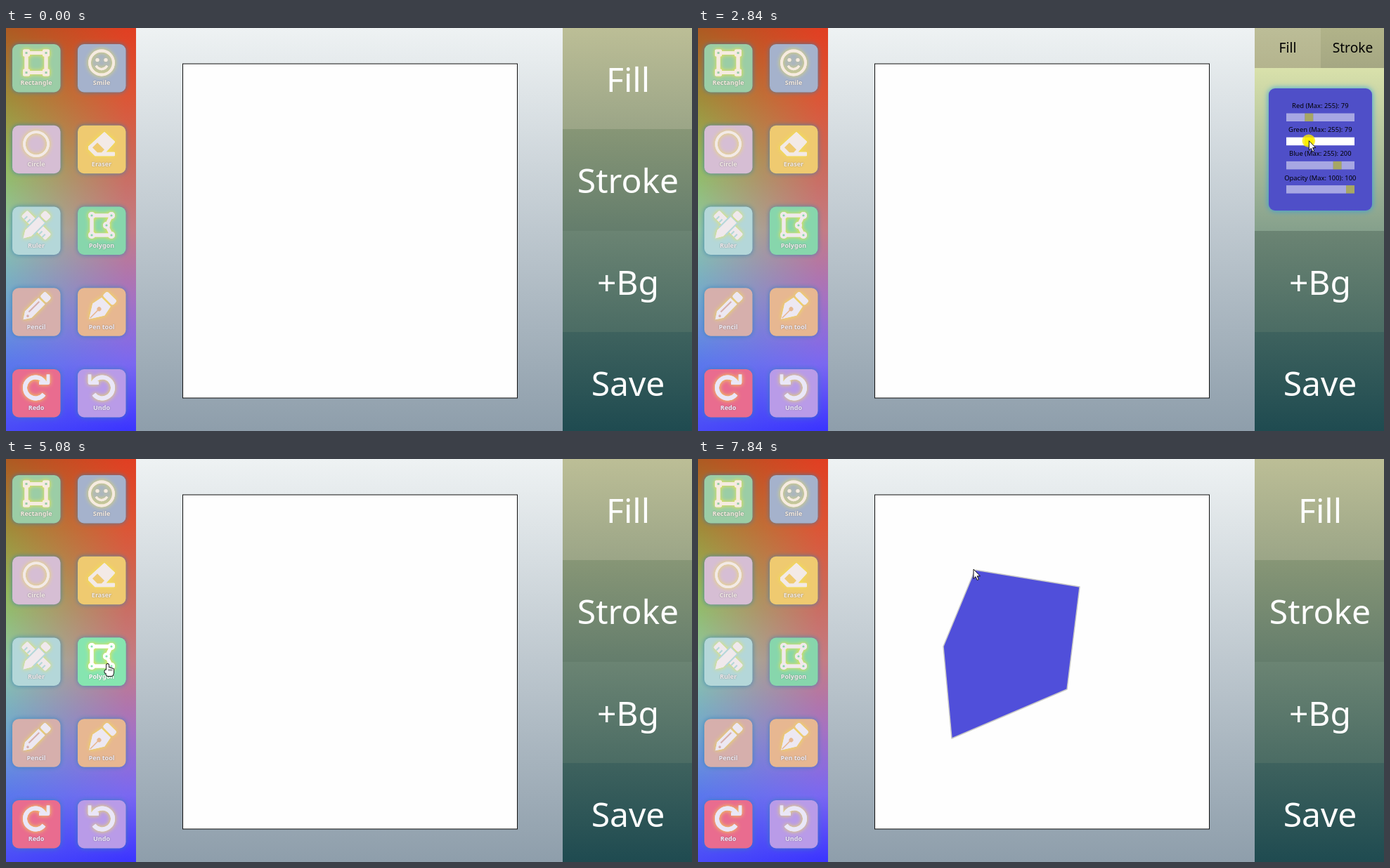
An HTML page with a canvas that plays this animation: 976x574 px, repeating every 7990 ms.

```html
<!DOCTYPE html>
<html lang="en">
<head>
<meta charset="utf-8">
<title>Drawing app</title>
<style>
html, body { margin: 0; width: 100%; height: 100%; overflow: hidden; }
canvas { display: block; }
</style>
</head>
<body>
<canvas id="stage" width="976" height="574"></canvas>
<script>
const LOOP = 7990;
const FONT = '"Noto Sans", "Open Sans", sans-serif';
const OPEN = 760, SHUT = 3450, FILLED = 7755;
const view = document.getElementById('stage').getContext('2d');
let g = view;

// name, drag start, drag length, final value (all begin at 200)
const CHANNELS = [['Red', 1610, 390, 79], ['Green', 2450, 300, 79], ['Blue', 3080, 110, 220]];
const CORNERS = [[394, 158], [543, 182], [525, 328], [361, 398], [349, 267]];

const clickTime = i => 5440 + 345 * i;
const rowY = i => 121.5 + 34.2 * i;
const thumbX = v => 837 + 85 * v;
const within = (t, a, b) => t >= a && t < b;
function ease(t, a, b, from, to) {
  const k = Math.min(1, Math.max(0, (t - a) / (b - a)));
  return from + (to - from) * k * k * (3 - 2 * k);
}

const path = [], presses = [];
function go(t, x, y, stay = 0) {
  path.push([t, x, y]);
  if (stay) path.push([t + stay, x, y]);
}
function buildPath() {
  go(70, 890, 512);
  go(610, 884, 40, 150);
  go(1220, 884, 55);
  CHANNELS.forEach(([, start, length, end], i) => {
    const y = rowY(i) + 5;
    go(start - 50, thumbX(200 / 255) + 6, y, 50);
    go(start + length, thumbX(end / 255) + 6, y, 130);
    presses.push([start, start + length + 130]);
  });
  go(3900, 150, 270);
  go(4220, 141, 225);
  go(4600, 145, 292, 530);
  CORNERS.forEach(([x, y], i) => {
    go(clickTime(i), x, y, 90);
    presses.push([clickTime(i), clickTime(i) + 90]);
  });
  go(7530, 391, 158);
  go(7610, 392, 157);
  presses.push([FILLED, FILLED + 80]);
}
function pointer(t) {
  let i = 0;
  while (i < path.length - 2 && t > path[i + 1][0]) i++;
  const [a, x0, y0] = path[i], [b, x1, y1] = path[i + 1];
  return { x: ease(t, a, b, x0, x1), y: ease(t, a, b, y0, y1) };
}

function rect(x, y, w, h, color) { g.fillStyle = color; g.fillRect(x, y, w, h); }
function round(x, y, w, h, r) { g.beginPath(); g.roundRect(x, y, w, h, r); g.fill(); }
function poly(points, close = true) {
  g.beginPath();
  points.forEach(([x, y]) => g.lineTo(x, y));
  if (close) g.closePath();
}
function dot(x, y, r) { g.beginPath(); g.arc(x, y, r, 0, 7); g.fill(); }
function ring(x, y, r, a = 0, b = Math.PI * 2) { g.beginPath(); g.arc(x, y, r, a, b); g.stroke(); }
function ramp(y, h, ...colors) {
  const r = g.createLinearGradient(0, y, 0, y + h);
  colors.forEach((c, i) => r.addColorStop(i / (colors.length - 1), c));
  return r;
}
function text(s, x, y, size, color, weight = 400) {
  g.font = `${weight} ${size}px ${FONT}`;
  g.textAlign = 'center';
  g.fillStyle = color;
  g.fillText(s, x, y);
}
function tilted(turns, draw) { g.save(); g.rotate(turns * Math.PI); draw(); g.restore(); }

// Icons fill a box of 38 around the origin; cut() carves with the tile colour.
function cut(color, draw) {
  g.save();
  g.shadowColor = 'transparent';
  g.fillStyle = color;
  draw();
  g.restore();
}
function pencil(half) {
  poly([[-26, 0], [-16, -half], [11, -half], [11, half], [-16, half]]);
  g.fill();
  round(14, -half, 10, half * 2, 2.5);
}
function turn() {
  g.lineWidth = 6;
  ring(-1, 0, 15, 0.65, 5.7);
  g.lineWidth = 4.5;
  poly([[17, -19], [17, -7], [4, -7]], false);
  g.stroke();
}
const SQUARE = [[-14, -14], [14, -14], [14, 14], [-14, 14]];
const ICONS = {
  Rectangle(c) {
    g.lineWidth = 5;
    g.strokeRect(-14, -14, 28, 28);
    SQUARE.forEach(([x, y]) => round(x - 5, y - 5, 10, 10, 2));
    cut(c, () => SQUARE.forEach(([x, y]) => g.fillRect(x - 1.5, y - 1.5, 3, 3)));
  },
  Smile() {
    g.lineWidth = 3.8;
    ring(0, 0, 17);
    dot(-6, -4, 2.5);
    dot(6, -4, 2.5);
    g.lineWidth = 3.2;
    ring(0, 0, 9, 0.5, 2.64);
  },
  Circle() { g.lineWidth = 3.6; ring(0, 0, 17); },
  Eraser(c) {
    g.lineWidth = 2;
    poly([[4, -16], [18, -3], [4, 12.5], [18, 12.5], [18, 16], [-9, 16], [-18, 7], [-18, 4]]);
    g.fill();
    g.stroke();
    cut(c, () => { poly([[-13, 5], [-6, -2], [4, 8], [0, 12], [-6, 12]]); g.fill(); });
  },
  Ruler(c) {
    tilted(0.25, () => {
      round(-24, -6, 48, 12, 2);
      cut(c, () => [-18, -12, 12, 18].forEach(x => g.fillRect(x - 1, 0, 2, 6)));
    });
    tilted(-0.25, () => {
      cut(c, () => g.fillRect(-12, -8, 24, 16));
      pencil(6);
    });
  },
  Polygon(c) {
    const knots = [...SQUARE];
    knots.splice(2, 0, [7, 0]);
    g.lineWidth = 5;
    poly(knots);
    g.stroke();
    knots.forEach(([x, y]) => dot(x, y, 5));
    cut(c, () => knots.forEach(([x, y]) => dot(x, y, 1.6)));
  },
  Pencil(c) {
    tilted(-0.25, () => {
      pencil(6.5);
      cut(c, () => { g.fillRect(-13, -3, 21, 2); dot(-18, 1, 1.8); });
    });
  },
  'Pen tool'(c) {
    tilted(-0.25, () => {
      poly([[-25, 0], [-6, -12], [9, -9], [9, 9], [-6, 12]]);
      g.fill();
      round(12, -10, 9, 20, 3);
      cut(c, () => { g.fillRect(-23, -0.8, 18, 1.6); dot(-5, 0, 3); });
    });
  },
  Redo: turn,
  Undo() { g.scale(-1, 1); turn(); }
};
const NAMES = Object.keys(ICONS);
const [RECT, SMILE, CIRCLE, ERASER, RULER, POLYGON, PENCIL, PEN, REDO, UNDO] = [
  '#9bcda6', '#a5b2cc', '#d6bed4', '#efca70', '#b4d7d9', '#87d6ac', '#d6afac', '#e7b791', '#e96c8f', '#b99be8'];
const TILES = [RECT, SMILE, CIRCLE, ERASER, RULER, POLYGON, PENCIL, PEN, REDO, UNDO];

function tile(i, color, ink, halo) {
  const row = i >> 1;
  const x = i % 2 ? 102 : 9, y = 23 + 115.75 * row;
  g.save();
  g.fillStyle = color;
  g.shadowColor = halo;
  g.shadowBlur = 7;
  round(x, y, 68.5, 68.5, 9);
  g.restore();

  // one pass lays the glow, the next keeps the shape clean
  for (const glow of ['#f4e64a', 'transparent']) {
    g.save();
    g.translate(x + 34, y + 26.5);
    g.lineJoin = 'round';
    g.fillStyle = g.strokeStyle = ink;
    g.shadowColor = glow;
    g.shadowBlur = 6;
    ICONS[NAMES[i]](color);
    g.restore();
  }

  g.save();
  g.shadowColor = 'rgba(80,80,80,.6)';
  g.shadowBlur = 2;
  text(NAMES[i], x + 34, y + 58.3, 9, ink, 700);
  g.restore();
}

function sidebar() {
  rect(0, 0, 185, 574, ramp(0, 574,
    '#ad5a22', '#a08a38', '#93b95c', '#8fc6a5', '#72a8cb', '#5a78ec', '#4a4af8'));
  const warm = ramp(0, 574, '#e03f22', '#dc5535', '#cb6a5a', '#c47c84', '#a672c0', '#7a68f0', '#3a34ff');
  for (let x = 0; x < 185; x++) {
    g.globalAlpha = Math.min(1, x / 170);
    rect(x, 0, 1, 574, warm);
  }
  g.globalAlpha = 1;
  TILES.forEach((color, i) => {
    const row = i >> 1;
    tile(i, color, `rgb(${246 - 3 * row},${235 - row},${224 + 6 * row})`, 'rgba(50,130,180,.85)');
  });
}

function backdrop() {
  rect(185, 0, 607, 574, ramp(0, 574, '#eef2f3', '#8e9eab'));
  rect(251, 50.5, 477, 477, '#111');
  rect(252, 51.5, 475, 475, '#fefefe');
  sidebar();
  const buttons = [['Fill', '#bcbe96', '#9ba587'], ['Stroke', '#879676', '#647d6c'],
    ['+Bg', '#6b8473', '#4b6c64'], ['Save', '#3e625e', '#1e4a50']];
  buttons.forEach(([label, top, bottom], i) => {
    const y = Math.round(144.4 * i);
    rect(792, y, 184, 145, ramp(y, 145, top, bottom));
    text(label, 885, y + 91, 48, '#fff', 500);
  });
}

function panel(t, at) {
  rect(792, 0, 94, 57, ramp(0, 57, '#bcbd97', '#b4b48e'));
  rect(886, 0, 90, 57, ramp(0, 57, '#b1b389', '#a5a783'));
  rect(792, 57, 184, 232, ramp(57, 232, '#d9e1ab', '#85a08c'));
  text('Fill', 839, 35, 19.2, '#000');
  text('Stroke', 931.5, 35, 19.2, '#000');

  const sliders = CHANNELS.map(([name, start, length, end]) =>
    [name, 255, Math.round(ease(t, start, start + length, 200, end))]);
  const color = `rgb(${sliders.map(s => s[2])})`;
  g.save();
  g.shadowColor = '#2aa0e0';
  g.shadowBlur = 8;
  g.fillStyle = color;
  round(812, 86, 147, 174, 9);
  g.restore();

  [...sliders, ['Opacity', 100, 100]].forEach(([name, max, value], i) => {
    const y = rowY(i), x = thumbX(value / max);
    text(`${name} (Max: ${max}): ${value}`, 885.3, y - 7.5, 9.4, '#000');
    const over = within(at.x, 836, 935) && within(at.y, y - 1, y + 12);
    g.globalAlpha = over ? 1 : 0.5;
    rect(837, y, x - 837, 11.5, '#fff');
    rect(x, y, 12, 11.5, '#ff0');
    rect(x + 12, y, 922 - x, 11.5, '#fff');
    g.globalAlpha = 1;
  });
}

function drawing(t) {
  const done = CORNERS.filter((_, i) => t >= clickTime(i));
  const filled = t >= FILLED;
  g.strokeStyle = '#c8c8c8';
  g.lineJoin = 'round';
  g.lineWidth = filled ? 1.5 : 2.8;
  poly(done, filled);
  if (filled) {
    g.fillStyle = '#504fda';
    g.fill();
  }
  g.stroke();
  if (filled) return;
  g.lineWidth = 2;
  done.forEach(([x, y]) => ring(x, y, 4));
}

function handShape() {
  g.beginPath();
  g.roundRect(-2, 0, 3.2, 12, 1.6);
  for (let k = 0; k < 3; k++) g.roundRect(1 + 2.2 * k, 5 + 0.7 * k, 2.6, 8, 1.3);
  g.roundRect(-4.5, 8.5, 4, 4.5, 1.6);
  g.roundRect(-2.5, 9, 10, 8, 3);
}
function cursor({ x, y }, hand) {
  g.save();
  g.translate(x, y);
  g.lineJoin = 'round';
  g.fillStyle = '#fff';
  g.strokeStyle = '#111';
  if (hand) {
    handShape();
    g.lineWidth = 1.8;
    g.stroke();
    g.fill();
    for (let k = 0; k < 3; k++) rect(1 + 2.2 * k, 7, 0.7, 3, '#111');
  } else {
    g.lineWidth = 1;
    poly([[0, 0], [0, 13.5], [3, 10.6], [5.2, 15.5], [7.4, 14.5], [5.2, 9.8], [9.4, 9.8]]);
    g.fill();
    g.stroke();
  }
  g.restore();
}

function paint(t) {
  const at = pointer(t);
  const open = within(t, OPEN, SHUT);
  g.drawImage(still, 0, 0);
  if (open) panel(t, at);
  if (within(t, 3950, 5240)) tile(NAMES.indexOf('Polygon'), '#86e5b0', '#fff', 'transparent');
  drawing(t);
  if (t < path[0][0]) return;
  if (presses.some(([a, b]) => within(t, a, b))) {
    g.fillStyle = 'rgba(255,236,0,.78)';
    dot(at.x - 0.5, at.y, 9.3);
  }
  const onTile = within(at.x, 102, 170) && within(at.y, 254, 322);
  cursor(at, at.x > 792 ? !open || at.y < 70 : onTile);
}

const still = document.createElement('canvas');
still.width = 976;
still.height = 574;
g = still.getContext('2d');
backdrop();
g = view;
buildPath();

function tick(now) {
  paint(now % LOOP);
  requestAnimationFrame(tick);
}
paint(0);
requestAnimationFrame(tick);
</script>
</body>
</html>
```
